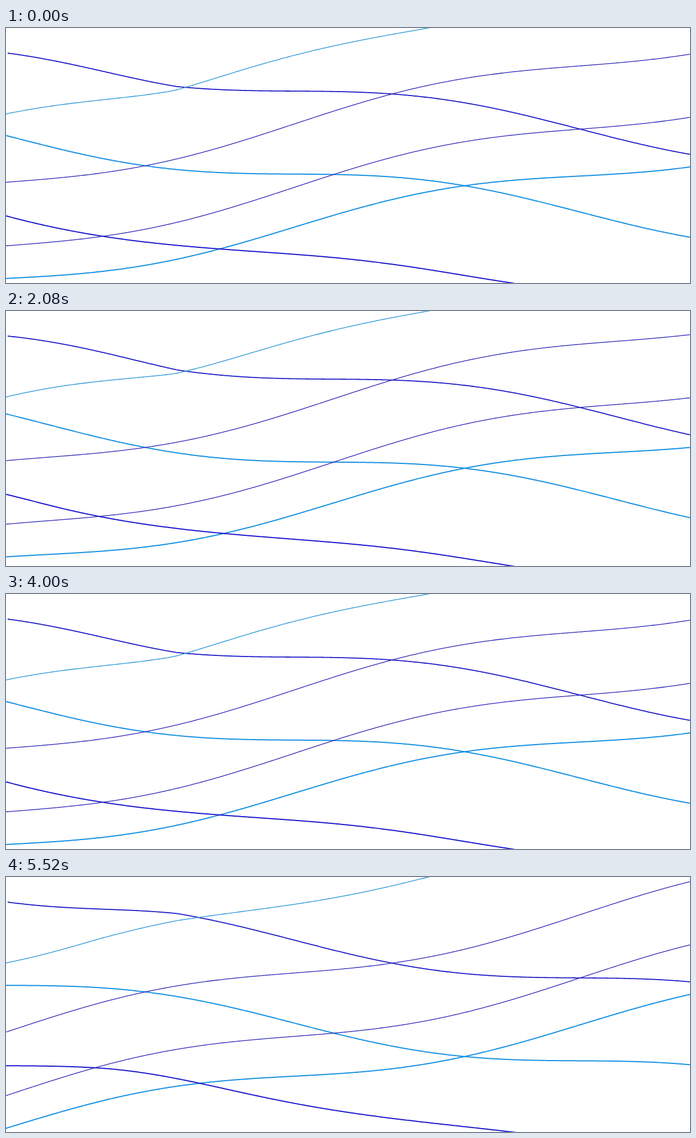
An HTML page with a canvas for the animation above (5600 ms loop, 1224 by 457 pixels).

```html
<!DOCTYPE html>
<html lang="en">
<head>
<meta charset="utf-8">
<title>Drifting lines</title>
<style>
  html, body { margin: 0; width: 100%; height: 100%; overflow: hidden; background: #fff; }
  canvas { display: block; }
</style>
</head>
<body>
<canvas id="stage" width="1224" height="457"></canvas>
<script>
const W = 1224, H = 457;
const ctx = document.getElementById('stage').getContext('2d');

const AMPLITUDE = 20.5, WAVELENGTH = 1020;
const PIN_X = W / 4, PIN_Y = H / 4;
const STEP_MS = 80, LOOP_MS = 5600;

// Straight lines y = y0 + slope * x; the pins hold a line still at that edge.
const lines = [
  { y0: 193.4, slope: 0.1326, color: '#1590e2', width: 2 },
  { y0: 449.6, slope: -0.1796, color: '#1590e2', width: 2 },
  { y0: 44.6, slope: 0.1328, color: '#1a17c6', width: 1.8, from: 3, left: true },
  { y0: 337.5, slope: 0.132, color: '#1a17cc', width: 2, bottom: true },
  { y0: 277.2, slope: -0.2039, color: '#2a22b4', width: 1.3 },
  { y0: 391.1, slope: -0.2045, color: '#2a22b4', width: 1.3 },
  { y0: 154, slope: -0.2037, color: '#2a96d6', width: 1.35, to: 760, left: true, top: true }
];

// Distance from a pinned edge after a shift that fades out towards the edge.
function pinned(distance, shift) {
  const free = distance + shift;
  return free > PIN_Y ? free : distance / (1 - shift / PIN_Y);
}

function lineY(line, x, phase) {
  const base = line.y0 + line.slope * x;
  let shift = AMPLITUDE * Math.sin(phase + 2 * Math.PI * x / WAVELENGTH);
  if (line.left) shift *= Math.min(1, x / PIN_X);
  if (line.top) return pinned(base, shift);
  if (line.bottom) return H - pinned(H - base, -shift);
  return base + shift;
}

function draw(time) {
  const step = Math.floor(time % LOOP_MS / STEP_MS);
  // The wave turns 12 degrees per tick, 30 ticks a second, held at the end.
  const tick = Math.min(165, Math.round(step * 2.4));
  const phase = -(12 * tick + 2) * Math.PI / 180;

  ctx.fillStyle = '#fff';
  ctx.fillRect(0, 0, W, H);
  for (const line of lines) {
    const { from = -2, to = W + 2 } = line;
    ctx.beginPath();
    for (let x = from; x <= to; x += 2) ctx.lineTo(x, lineY(line, x, phase));
    ctx.strokeStyle = line.color;
    ctx.lineWidth = line.width;
    ctx.stroke();
  }
}

const start = performance.now();
function loop() {
  draw(performance.now() - start);
  requestAnimationFrame(loop);
}
loop();
</script>
</body>
</html>
```
